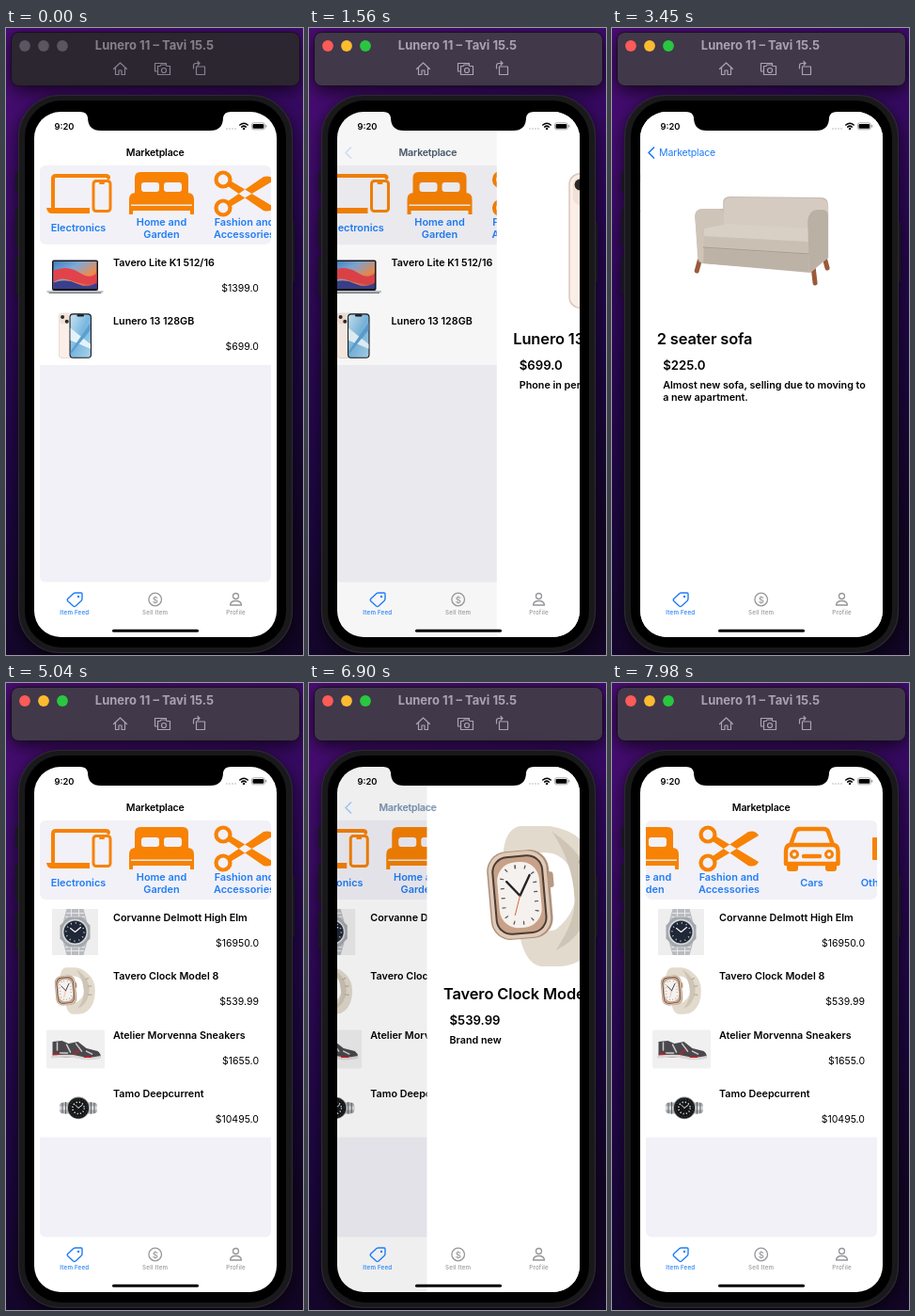
An HTML page for the animation above (8000 ms loop, 316 by 666 pixels).

```html
<!DOCTYPE html>
<html lang="en">
<head>
<meta charset="utf-8">
<title>Marketplace</title>
<style>
html, body { margin: 0; width: 100%; height: 100%; overflow: hidden; background: #1a0738; }
svg { display: block; font-family: Inter, Roboto, sans-serif; }
.line { fill: none; stroke-linecap: round; stroke-linejoin: round; }
.shadow { filter: drop-shadow(0 5px 9px #000a); }
</style>
</head>
<body>
<svg id="stage" width="316" height="666" viewBox="0 0 316 666"></svg>
<script>
const BLUE = '#1f7df6', ORANGE = '#f78204', PANEL = '#f2f1f7';
const PITCH = 62.3;

const text = (x, y, s, size = 10.75, weight = 600, fill = '#000', anchor = 'start', extra = '') =>
  `<text x="${x}" y="${y}" font-size="${size}" font-weight="${weight}" fill="${fill}" text-anchor="${anchor}" ${extra}>${s}</text>`;
const rect = (x, y, w, h, fill, r = 0, extra = '') =>
  `<rect x="${x}" y="${y}" width="${w}" height="${h}" rx="${r}" fill="${fill}" ${extra}/>`;
const circle = (x, y, r, fill, extra = '') =>
  `<circle cx="${x}" cy="${y}" r="${r}" fill="${fill}" ${extra}/>`;
const line = (d, stroke, width, extra = '') =>
  `<path class="line" d="${d}" stroke="${stroke}" stroke-width="${width}" ${extra}/>`;
const shape = (d, fill) => `<path d="${d}" fill="${fill}"/>`;
const group = (body, extra = '') => `<g ${extra}>${body}</g>`;
const gradient = (id, coords, ...stops) =>
  `<linearGradient id="${id}" ${coords}>${stops.map((c, i) =>
    `<stop offset="${i / (stops.length - 1)}" stop-color="${c}"/>`).join('')}</linearGradient>`;

// Product pictures, centred on 0,0 at thumbnail size
const art = {
  laptop:
    rect(-24.5, -18, 49, 32.5, '#17171c', 2) + rect(-23, -16.5, 46, 29, 'url(#wall)') +
    shape('M-23 -7Q-8 -13 4 -5T23 -4V7Q8 9 -4 4T-23 6Z', '#e2434a') +
    shape('M-23 6Q-10 1 2 7T23 6V12.5H-23Z', '#3a3f8b') +
    rect(-30, 14.5, 60, 2, '#c3c5ca') + rect(-28, 16.2, 56, 1.3, '#77797f', .6),
  phone:
    rect(-17.5, -24, 24, 48, '#d9c8be', 4) + rect(-17, -23.5, 23, 47, '#fbeee6', 3.6) +
    rect(-16, -22.5, 10, 10, '#f1e0d6', 2.8) +
    circle(-13.4, -19.8, 2, '#2c2827') + circle(-8.8, -15, 2, '#2c2827') +
    rect(-6, -23.5, 23.5, 47.5, '#16181c', 3.8) + rect(-4.9, -22.4, 21.3, 45.3, 'url(#sky)', 2.8) +
    shape('M-4.9 -8L16.4 9V14L-4.9 5Z', '#e4f3fb') + shape('M-4.9 17L16.4 -14V-6L-4.9 20Z', '#5d9fd0') +
    rect(2, -22.6, 7.5, 2.2, '#16181c', 1),
  chair:
    line('M-10.5 -23L-8 3M8 -23.5L9.5 1M-9 -19H8M-9 -13H8.5M-8.5 -7.5H9', '#a57847', 2) +
    line('M-8 4L-11 23M9 2L11.5 15M3 6L4 24M-6 4L-4 14M-9 14L4 17', '#946536', 2) +
    shape('M-10 1L7 -1L12 3L4 7L-12 5Z', '#d9cbb4'),
  sofa: group(
    line('M93 247L90 258M214 254L216 271M226 244L229 255', '#9a5a3c', 5) +
    shape('M118 184Q119 179 126 179L222 180Q230 180 230 188V244L211 260L96 250Q91 249 91 244L88 199Q89 192 97 192H118Z', '#c5bbaf') +
    shape('M119 187Q119 180 126 180L221 181Q230 182 230 190V205L208 216L118 209Z', '#d5cbc0') +
    shape('M97 211L121 208L209 213V239L97 232Z', '#d9d0c5') +
    shape('M97 221L209 227V240L97 233Z', '#cabfb3') +
    shape('M97 234L209 241V259L97 250Z', '#bdb2a6') +
    shape('M88 200Q88 192 97 192H112Q119 192 119 199V209L98 213L97 249L92 246Z', '#cfc4b8') +
    shape('M208 205Q209 194 218 193H224Q230 193 230 200V244L210 259Z', '#bbb0a4') +
    line('M97 233L209 240', '#a79c90', 1),
    'transform="scale(.333) translate(-159 -226)"'),
  gold:
    rect(-24.5, -11, 49, 20, '#98600f', 3) + rect(-21, -10.5, 20.5, 10, '#bd8322', 2) + rect(0, -10.5, 20.5, 10, '#b97e1f', 2) +
    rect(-20, -1, 40, 5, '#d29a36', 1.5) + rect(-24.5, -7, 5, 16, '#b0741a', 2) + rect(19.5, -7, 5, 16, '#a66b14', 2) +
    line('M-21 9V12M21 9V12M0 -10V4', '#64400c', 1),
  seat:
    line('M-9 4L-16 21M10 3L16 23M-3 7L3 23M-16 21H-9M5 -3L9 16', '#8d8a88', 1) +
    shape('M-14 -21Q-13 -24 -8 -23.5L8 -22Q13 -21 12 -16L14 1Q14 5 8 6L-8 7Q-13 6 -11 1Z', '#a25b3d') +
    shape('M-11 1L13 -1Q15 4 9 6L-8 7.5Q-14 6 -11 1Z', '#84432b'),
  steel:
    rect(-24.5, -24.5, 49, 49, '#eeeeef') +
    shape('M-9 -24.5H9L13 -10H-13ZM-13 10H13L9 24.5H-9Z', '#b9bcc0') +
    line('M-4 -24V-12M4 -24V-12M-9 -20H9M-10 -16H10M-4 24V12M4 24V12M-9 20H9M-10 16H10', '#e7e8ea', 1) +
    shape('M-7 -16H7L16 -7V7L7 16H-7L-16 7V-7Z', '#a3a6ab') + circle(0, 0, 13.8, '#d4d6d9') + circle(0, 0, 12, '#202838') +
    circle(0, 0, 9.6, 'none', 'stroke="#cfd3da" stroke-width="1.6" stroke-dasharray="1 4.03"') +
    line('M0 0L-5 -4M0 0L6 -5', '#fff', 1.1),
  smart: group(
    shape('M206 182Q208 155 224 152H256Q280 156 291 169Q318 190 318 226Q318 272 292 292Q280 301 264 301H246Q230 298 224 270L262 262Q290 240 282 206Q272 180 250 180Z', '#e2dacd') +
    shape('M258 158Q302 186 299 228Q296 268 262 284Q284 252 282 228Q280 190 258 158Z', '#cfc5b6') +
    line('M288 190L296 186M296 212L306 211M296 238L306 240', '#b9ad9d', 4) +
    group(
      rect(191, 178, 66, 94, '#ad907b', 21) + rect(192.5, 179, 62, 92, '#e0cab7', 20) + rect(196, 183, 55, 84, '#4a3c34', 17) +
      rect(198, 185, 51, 80, '#c7a288', 15) + rect(201, 190, 45, 70, '#f5f1ee', 20) +
      rect(206, 195, 35, 60, 'none', 15, 'stroke="#5e5350" stroke-width="4" stroke-dasharray="1.2 9"') +
      line('M224 226L211 210M224 226L236 205', '#272326', 2.4) + line('M224 226L217 246', '#d4683c', 1) +
      rect(255, 203, 6, 17, '#b79982', 3), 'transform="rotate(-5 224 226)"'),
    'transform="scale(.333) translate(-254 -226)"'),
  shoe:
    rect(-30.5, -20.5, 62, 41, '#f0f0f1', 2) +
    shape('M-24 -8L-14 -9L-7 -6L3 -8L12 -1L24 2Q28 5 27 9L-24 9Z', '#4a484c') +
    line('M-24 8Q-6 6 4 8.500T26 8.500', '#dcd7d6', 3) +
    line('M-19 -7V1M-9 -5L-5 3M1 -6L7 2M12 2L18 5M-16 4H-8', '#cfcccd', 1.5) +
    line('M-23 5H-17M-1 5L4 1M10 8H17', '#b3242c', 1.8),
  diver: group(
    rect(-20, -6, 40, 12, '#aeb1b4', 4) + rect(-20, -2, 40, 4, '#dadcde') +
    line('M-17 -5V5M-13.5 -6V6M13.5 -6V6M17 -5V5', '#55585c', .9) +
    circle(0, 0, 11.8, '#8e9194') + circle(0, 0, 11, '#151617') +
    circle(0, 0, 9.3, 'none', 'stroke="#9b9da0" stroke-width=".6" stroke-dasharray=".8 2"') +
    circle(0, 0, 6.2, 'none', 'stroke="#eceeee" stroke-width="1.5" stroke-dasharray="1.2 2.05"') +
    line('M0 0L-3 -3M0 0L4 -3', '#fff', .9),
    'transform="translate(3.5 0)"')
};

const lists = [
  [['laptop', 'Tavero Lite K1 512/16', '$1399.0'], ['phone', 'Lunero 13 128GB', '$699.0']],
  [['chair', 'Kitchen chair', '$24.0'], ['sofa', '2 seater sofa', '$225.0'],
   ['gold', 'Art Deco Sofa', '$999.0'], ['seat', 'Living room chair', '$90.0']],
  [['steel', 'Corvanne Delmott High Elm', '$16950.0'], ['smart', 'Tavero Clock Model 8', '$539.99'],
   ['shoe', 'Atelier Morvenna Sneakers', '$1655.0'], ['diver', 'Tamo Deepcurrent', '$10495.0']]
];
const notes = [['Phone in perfect condition.'], ['Almost new sofa, selling due to moving to', 'a new apartment.'], ['Brand new']];

const listView = (rows, i) => group(
  rect(36, 226, 246, 7.4 + PITCH * rows.length, '#fff') +
  rows.map(([pic, name, price], r) => {
    const y = PITCH * r;
    return group(art[pic], `transform="translate(73.5 ${264.5 + y})"`) +
      text(114, 253 + y, name) + text(269, 280 + y, price, 10.5, 400, '#000', 'end');
  }).join(''), `id="list${i}"`);

// Every detail page shows the second item of its list
const detailView = ([, [pic, name, price]], i) => group(
  group(art[pic], 'transform="translate(159 226) scale(3)"') +
  text(47.5, 336, name, 16.4, 600, '#000', 'start', 'letter-spacing="-.1"') + text(54, 362.5, price, 13.2) +
  notes[i].map((s, n) => text(54, 383 + 13 * n, s)).join(''), `id="item${i}"`);

const label = (x, ...lines) => lines.map((s, i) =>
  text(x, (lines.length > 1 ? 210 : 216) + 13 * i, s, 10.9, 600, BLUE, 'middle')).join('');

const categories =
  line('M50 190V160Q50 157 53 157H106Q109 157 109 159', ORANGE, 4) +
  shape('M43 191H89V197H49Q44 197 43 191Z', ORANGE) +
  rect(93, 162.5, 18, 32, 'none', 3, `stroke="${ORANGE}" stroke-width="3"`) + line('M100 165H104', ORANGE, 2) +
  label(77, 'Electronics') +
  shape('M137 180V159Q137 153 143 153H188Q194 153 194 159V180Z', ORANGE) +
  rect(144, 164, 19, 10, PANEL, 3) + rect(168, 164, 19, 10, PANEL, 3) +
  shape('M131 198V182Q131 175 138 175H193Q200 175 200 182V198H196V194H135V198Z', ORANGE) +
  rect(133, 187.5, 65, 1.4, PANEL) +
  label(165.5, 'Home and', 'Garden') +
  circle(231, 161, 7.5, 'none', `stroke="${ORANGE}" stroke-width="4.2"`) +
  circle(231, 191, 7.5, 'none', `stroke="${ORANGE}" stroke-width="4.2"`) +
  shape('M236 168L240 163L285 190Q282 196 274 194ZM236 184L240 189L285 162Q282 156 274 158Z', ORANGE) +
  circle(253, 176, 2, PANEL) +
  label(253.5, 'Fashion and', 'Accessories') +
  line('M319 172L324 158Q325 155 329 155H354Q358 155 359 158L364 172M318 172H365Q369.500 173 369.500 179V192H314V179Q314 173 318 172ZM333 184H350', ORANGE, 4.4) +
  circle(323, 182, 3.5, 'none', `stroke="${ORANGE}" stroke-width="3"`) +
  circle(360, 182, 3.5, 'none', `stroke="${ORANGE}" stroke-width="3"`) +
  rect(315, 190, 12, 10, ORANGE, 3) + rect(356, 190, 12, 10, ORANGE, 3) +
  label(341.5, 'Cars') +
  rect(406, 164, 46, 24, ORANGE, 1) +
  label(429.5, 'Other articles');

const tab = (x, s, color) => text(x, 623, s, 6.2, 500, color, 'middle', 'letter-spacing=".2"');
const tabs =
  line('M66 606L72 600.5Q73 599.8 74.5 600H80Q81 600 81 601V606Q81 607.5 80 608.5L74 614Q72.800 615 71.500 614L66 609Q64.500 607.500 66 606Z', BLUE, 1.4) +
  circle(77, 604, 1.2, BLUE) + tab(72.8, 'Item Feed', BLUE) +
  circle(158.7, 607, 6.8, 'none', 'stroke="#96969a" stroke-width="1.3"') +
  text(158.7, 610.5, '$', 9.5, 500, '#96969a', 'middle') + tab(158.7, 'Sell Item', '#96969a') +
  circle(244.5, 603.5, 3, 'none', 'stroke="#96969a" stroke-width="1.3"') +
  line('M238.500 613Q239 608.500 244.500 608.500T250.500 613Z', '#96969a', 1.3) + tab(244.5, 'Profile', '#96969a') +
  rect(113, 638.7, 92, 3, '#000', 1.5);

const status =
  shape('M79 89Q86 89 87 95Q87 109 101 109H217Q231 109 231 95Q232 89 239 89Z', '#000') +
  text(62, 107.6, '9:20', 9.4, 600, '#000', 'middle') +
  [235, 238, 241, 244].map(x => circle(x, 107, .8, '#b4b4b6')).join('') +
  line('M248.800 103Q253 99.500 257.200 103M250.700 105.100Q253 103.200 255.300 105.100', '#000', 1.5) + circle(253, 107, 1.2, '#000') +
  rect(261.4, 100.8, 14, 7, 'none', 2.2, 'stroke="#8a8a8c" stroke-width=".7"') +
  rect(262.5, 101.9, 11.8, 4.8, '#000', 1.2) + rect(276.3, 103, 1, 2.6, '#8a8a8c', .5);

const bar =
  rect(5.5, 4.5, 307, 57, '#41384a', 8, 'id="bar" class="shadow" stroke="#1a0d22"') +
  [20, 40, 60].map(x => circle(x, 19, 5.9, '', 'class="light"')).join('') +
  text(158, 23.3, 'Lunero 11 – Tavi 15.5', 13, 700, '#aaa2b0', 'middle', 'id="caption"') +
  group(
    line('M114.500 43.500L121.500 37L128.500 43.500M116.500 42V49.500H120V45H123V49.500H126.500V42', '#aaa3b0', 1.2) +
    line('M160.500 46H158.500V37.500H170.500V39M161.500 40.500H164L165 39H170L171 40.500H174.500V49.500H161.500Z', '#aaa3b0', 1.2) +
    circle(168, 45, 2.5, 'none', 'stroke="#aaa3b0" stroke-width="1.2"') +
    line('M202.500 41H211.500V49.500H202.500ZM199.500 43V40Q199.500 37.500 202 37.500H206M204 35.500L206 37.500L204 39.500', '#aaa3b0', 1.2), 'id="tools"');

const device = group(
  [[10, 153, 22], [10, 192, 40], [10, 243, 40], [301, 205, 65]].map(([x, y, h]) => rect(x, y, 6, h, '#18161c', 1.5)).join('') +
  rect(13.5, 71.5, 291, 592, '#19181b', 44, 'stroke="#2c292f" stroke-width="1.2"') +
  rect(20, 77, 278, 581, '#000', 39), 'class="shadow"');

document.getElementById('stage').innerHTML =
  '<defs>' +
  gradient('night', 'x1="0" y1="0" x2=".25" y2="1"', '#4a0d74', '#3f0c6c', '#2a0854', '#1c0740', '#130626') +
  gradient('wall', 'x1="0" y1="0" x2="1" y2="1"', '#3d7fc4', '#7fa9d6', '#f08a4b', '#8a2c68') +
  gradient('sky', 'x1="0" y1="0" x2="1" y2="1"', '#c9e3f2', '#79b7de', '#a6d2ea') +
  '<clipPath id="screen">' + rect(30, 89, 258, 558, '#000', 28) + '</clipPath>' +
  '<clipPath id="strip">' + rect(36, 146, 246, 84, '#000', 6) + '</clipPath></defs>' +
  rect(0, 0, 316, 666, 'url(#night)') +
  bar + device +
  group(
    rect(30, 89, 258, 558, '#fff') +
    group(
      rect(36, 146, 246, 442.5, PANEL, 6) + lists.map(listView).join('') +
      group(rect(36, 146, 246, 84, PANEL, 6) + group(categories, 'id="cats"'), 'clip-path="url(#strip)"'),
      'id="page"') +
    rect(30, 89, 258, 558, '#000', 0, 'id="dim"') +
    group(rect(30, 89, 258, 558, '#fff') + lists.map(detailView).join(''), 'id="detail"') +
    text(0, 136, 'Marketplace', 10.6, 600, '#000', 'middle', 'id="title" letter-spacing="-.2"') +
    group(text(0, 136, 'Marketplace', 10.6, 400, BLUE, 'middle', 'id="back" letter-spacing="-.2"') +
      line('M44.500 127L39 132.500L44.500 138', BLUE, 1.7, 'id="chevron"'), 'id="nav"') +
    tabs, 'clip-path="url(#screen)"') +
  status;

const set = (id, attrs) => {
  const node = document.getElementById(id);
  for (const k in attrs) node.setAttribute(k, attrs[k]);
};
const clamp = x => Math.min(1, Math.max(0, x));

// cubic-bezier(.36, .66, .04, 1)
function slide(x) {
  if (x <= 0 || x >= 1) return clamp(x);
  const curve = (a, b, s) => 3 * a * s * (1 - s) ** 2 + 3 * b * s * s * (1 - s) + s ** 3;
  let lo = 0, hi = 1;
  for (let i = 0; i < 20; i++) {
    const mid = (lo + hi) / 2;
    if (curve(.36, .04, mid) < x) lo = mid; else hi = mid;
  }
  return curve(.66, 1, lo);
}

const visits = [[495, 1442], [2985, 4052], [5895, 6824]];

function draw(t) {
  const shown = t < 2160 ? 0 : t < 5010 ? 1 : 2;
  const [open, close] = visits[shown];
  const p = slide((t - open) / 500) - slide((t - close) / 500);
  const active = t >= 480;

  set('bar', { fill: active ? '#41384a' : '#2b2630' });
  set('caption', { fill: active ? '#aaa2b0' : '#858089' });
  set('tools', { opacity: active ? 1 : .72 });
  document.querySelectorAll('.light').forEach((dot, i) =>
    dot.setAttribute('fill', active ? ['#fc5b57', '#fdbb2e', '#29c73f'][i] : '#5a555e'));

  for (let i = 0; i < 3; i++) {
    const display = i === shown ? 'inline' : 'none';
    set('list' + i, { display });
    set('item' + i, { display });
  }
  set('page', { transform: `translate(${-77.4 * p})` });
  set('dim', { opacity: .1 * p });
  set('detail', { transform: `translate(${258 * (1 - p)})`, display: p > 0 ? 'inline' : 'none' });
  const x = 158.7 - 78.7 * p ** .83;
  set('title', { x, opacity: 1 - p });
  set('back', { x, opacity: p });
  set('chevron', { opacity: p });
  set('nav', { opacity: t > close - 32 ? .6 : 1 });

  const u = clamp((t - 7540) / 440);
  set('cats', { transform: `translate(${-129 * u * u * (3 - 2 * u)})` });
}

function frame() {
  draw(performance.now() % 8000);
  requestAnimationFrame(frame);
}
frame();
</script>
</body>
</html>
```
